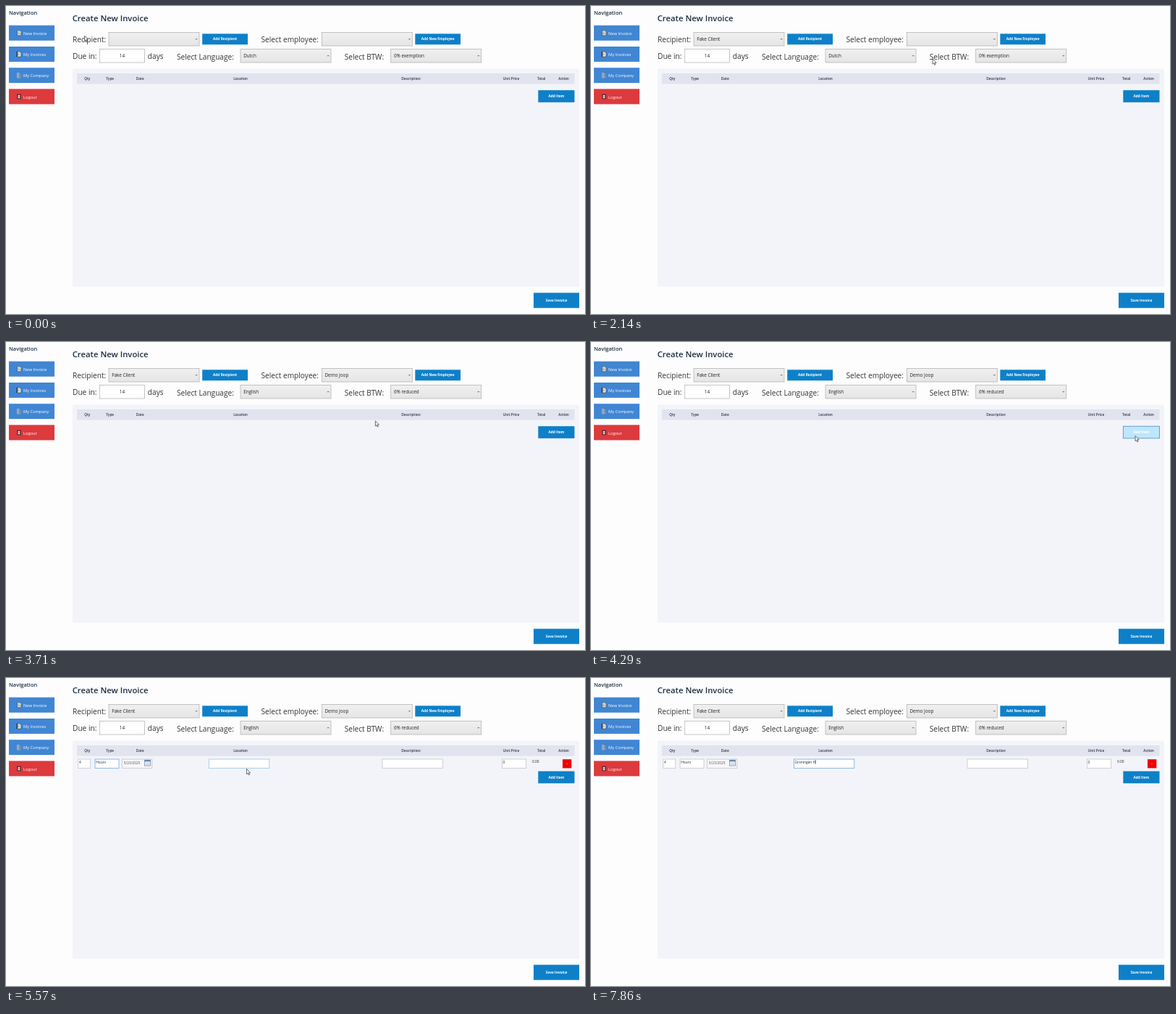
An HTML page that plays this animation: 800x425 px, repeating every 8000 ms.

```html
<!DOCTYPE html>
<html lang="en">
<head>
<meta charset="utf-8">
<title>Create New Invoice</title>
<style>
html, body { margin: 0; width: 100%; height: 100%; overflow: hidden; background: #fdfdfe; }
svg { display: block; width: 800px; height: 425px; }
text { font-family: "Open Sans", "Noto Sans", sans-serif; white-space: pre; }
</style>
</head>
<body>
<svg id="stage" viewBox="0 0 800 425"></svg>
<script>
const LOOP = 8000, STEPS = 56;
const BLUE = '#0e80c8', NAVY = '#1e2d44', FOCUS = '#569de5';
const CLIENT = 'Fake Client', WORKER = 'Demo Joop';

const rect = (x, y, w, h, fill, stroke, extra = '') =>
  `<rect x="${x}" y="${y}" width="${w}" height="${h}" fill="${fill}"` +
  (stroke ? ` stroke="${stroke}" stroke-width=".7"` : '') + ` ${extra}/>`;
const text = (x, y, s, size, fill = '#222', weight = 400, anchor = 'start') =>
  `<text x="${x}" y="${y}" font-size="${size}" fill="${fill}" font-weight="${weight}" text-anchor="${anchor}">${s}</text>`;
const path = (d, fill, extra = '') => `<path d="${d}" fill="${fill}" ${extra}/>`;

// Pointer tip by step, linear in between
const pointerKeys = [
  [0, 108.5, 41], [2, 125, 43], [6, 236, 51], [7, 215, 48], [9, 175, 61], [10, 172, 62],
  [13, 470, 46], [14, 473, 61], [15, 472, 73], [17, 560, 70], [18, 562, 95], [19, 470, 84],
  [20, 360, 69], [21, 360, 70], [23, 354, 95], [24, 354, 96], [29, 745, 128], [30, 752, 129.5],
  [31, 752, 129.5], [34, 113, 119], [36, 113, 119], [37, 140, 119], [38, 142, 119],
  [39, 332.5, 125.5], [40, 326, 121]
];
function pointerAt(k) {
  const i = pointerKeys.findIndex(p => p[0] >= k);
  if (i < 0) return null;
  if (i === 0) return pointerKeys[0].slice(1);
  const [k0, x0, y0] = pointerKeys[i - 1], [k1, x1, y1] = pointerKeys[i];
  const u = (k - k0) / (k1 - k0);
  return [x0 + (x1 - x0) * u, y0 + (y1 - y0) * u];
}
const over = (p, x, y, w, h) =>
  p && p[0] >= x && p[0] <= x + w && p[1] >= y && p[1] <= y + h + 2;

const combos = [
  { x: 142, y: 36.5, open: 7, set: 10, before: '', after: CLIENT, items: [CLIENT] },
  { x: 436.3, y: 36.5, open: 13, set: 15, delay: 1, before: '', after: WORKER, items: [WORKER] },
  { x: 324, y: 59.5, open: 21, set: 24, before: 'Dutch', after: 'English', items: ['Dutch', 'English'] },
  { x: 531.7, y: 59.5, open: 17, set: 19, before: '0% exemption', after: '6% reduced',
    items: ['0% exemption', '6% reduced', '21% standard'] }
];
const COMBO_W = 125, COMBO_H = 18.5, ITEM_H = 11;

function combo(c, k, p) {
  const isOpen = k >= c.open && k < c.set;
  const hot = isOpen || over(p, c.x, c.y, COMBO_W, COMBO_H);
  const ax = c.x + COMBO_W - 5.5, ay = c.y + 8.4;
  return rect(c.x, c.y, COMBO_W, COMBO_H, hot ? 'url(#hot)' : 'url(#idle)', hot ? '#7eb4ea' : '#acacac') +
    path(`M${ax} ${ay}h3.2l-1.6 1.9z`, hot ? '#222' : '#777') +
    text(c.x + 4.2, c.y + 11.5, k >= c.set + (c.delay || 0) ? c.after : c.before, 6.35);
}
function popup(c, k, p) {
  if (k < c.open || k >= c.set) return '';
  const top = c.y + COMBO_H + .5;
  return rect(c.x, top, COMBO_W, c.items.length * ITEM_H + 1, '#fff', '#888') +
    c.items.map((s, i) => {
      const y = top + .5 + i * ITEM_H;
      const hot = p && p[1] >= y && p[1] < y + ITEM_H;
      return (hot ? rect(c.x + .8, y, COMBO_W - 1.6, ITEM_H, '#d4e8f9', '#8dbfea') : '') +
        text(c.x + 4.2, y + 7.7, s, 6.35);
    }).join('');
}
function button(x, y, w, h, label, hot) {
  return rect(x, y, w, h, hot ? '#bee6fd' : BLUE, hot ? '#3c7fb1' : '') +
    text(x + w / 2, y + h / 2 + 1.7, label, 4.8, '#fff', 700, 'middle');
}

const docIcon = y =>
  path(`M15.5 ${y - 3.5}h3.5l1.8 1.8v5.2h-5.3z`, '#eef1f4', 'stroke="#26364a" stroke-width=".6"') +
  path(`M16.5 ${y - 1.5}h2M16.5 ${y}h2M16.5 ${y + 1.5}h2`, 'none', 'stroke="#39434e" stroke-width=".6"');
const icons = [
  y => docIcon(y) + path(`M18 ${y + 2}l3-3`, 'none', 'stroke="#d79a36" stroke-width="1"'),
  y => docIcon(y) + path(`M15.3 ${y - 3.5}v7`, 'none', 'stroke="#222" stroke-width="1.2"'),
  y => rect(15.2, y - 3.5, 3.2, 7, '#b9c1c8') + rect(18.4, y - 1.7, 2.5, 5.2, '#87939e') +
    path(`M16 ${y - 2}h1.5M16 ${y}h1.5M16 ${y + 2}h1.5M19 ${y}h1.3`, 'none', 'stroke="#34536d" stroke-width=".7"'),
  y => rect(15.5, y - 3.3, 5, 6.6, '#2b2022') + rect(16.6, y - 2.2, 2.7, 4.5, '#f4eeee') +
    path(`M18 ${y - .8}v1.6`, 'none', 'stroke="#b33" stroke-width="1"')
];
const nav = ['New Invoice', 'My Invoices', 'My Company', 'Logout'].map((s, i) => {
  const y = 26.7 + i * 29.25;
  return rect(4, y, 63, 21, i === 3 ? '#dc3a3d' : '#4186d3') +
    icons[i](y + 10.6) + text(24, y + 13.1, s, 5.75, '#fff');
}).join('');

const labels = [
  [92, 50, 'Recipient:'], [352.5, 50, 'Select employee:'], [92, 73, 'Due in:'],
  [195.8, 73, 'days'], [236, 73.5, 'Select Language:'], [467.7, 73.5, 'Select BTW:']
].map(([x, y, s]) => text(x, y, s, 10.15, '#333')).join('');

const headers = [
  [112.3, 'Qty'], [143.7, 'Type'], [185.3, 'Date'], [324, 'Location'], [559.5, 'Description'],
  [698, 'Unit Price'], [739.7, 'Total'], [770.6, 'Action']
].map(([x, s]) => text(x, 101.9, s, 4.75, '#2b3345', 600, 'middle')).join('');

const backdrop = `<defs>
  <linearGradient id="idle" x2="0" y2="1"><stop stop-color="#f0f0f0"/><stop offset="1" stop-color="#e5e5e5"/></linearGradient>
  <linearGradient id="hot" x2="0" y2="1"><stop stop-color="#ecf4fc"/><stop offset="1" stop-color="#dcecfc"/></linearGradient>
  </defs>` + rect(0, 0, 800, 425, '#fdfdfe') +
  text(4, 12, 'Navigation', 7.5, NAVY, 600) + nav +
  text(91.7, 20.8, 'Create New Invoice', 11.3, NAVY, 600) + labels +
  rect(129.3, 59.5, 62.2, 18.5, '#fff', '#abadb3') + text(160.4, 71, '14', 6.35, '#222', 400, 'middle') +
  button(271.2, 38.3, 62.8, 14.9, 'Add Recipient') + button(565.3, 38.3, 62.7, 14.9, 'Add New Employee') +
  rect(92, 86.5, 700, 301, '#f3f4f9', '', 'rx="2"') + rect(98, 93, 687.5, 14.6, '#e1e4ee') + headers +
  button(729, 395.7, 63, 21, 'Save Invoice');

// Location field: typed, then corrected
function locationText(k) {
  const tail = ['', ' ', ' H', ' Ho', ' Hof', ' Hofs', ' Ho', ' H'];
  return k < 48 ? 'Groningen'.slice(0, Math.max(0, k - 40)) + (k >= 47 ? 'ng' .slice(0, 0) + 'en'.slice(0, k >= 48 ? 2 : 0) : '')
    : 'Groningen' + tail[k - 48];
}
function field(x, w, value, mode) {
  const stroke = mode === 'focus' ? FOCUS : mode === 'hover' ? '#8abbe8' : '#b9bcc3';
  return rect(x, 112, w, 12.3, '#fff', stroke) + text(x + 1.3, 117.6, value, 4.8);
}
const calendar = rect(191.6, 113.2, 8, 7.8, '#fff', '#5e7792') + rect(191.6, 113.2, 8, 2.1, '#5c83b8') +
  path('M193 117h5.4M193 119.2h5.4', 'none', 'stroke="#7d8ba0" stroke-width="1" stroke-dasharray="1.2 .8"');

function row(k, p) {
  const qtyFocus = k >= 35 && k < 37, typeFocus = k >= 37 && k < 41;
  const type = 'Hours'.slice(0, k < 38 ? 0 : k < 39 ? 3 : 5);
  const locMode = k >= 41 ? 'focus' : over(p, 280.3, 112, 83.5, 12.3) ? 'hover' : '';
  return field(99.8, 17, k >= 36 ? '4' : '0', qtyFocus && 'focus') +
    field(123, 33, type, typeFocus && 'focus') +
    rect(160.3, 112, 41.5, 12.3, '#f7f7f9', '#b9bcc3') + text(162.7, 118.7, '5/23/2025', 4.85, '#555') + calendar +
    field(280.3, 83.5, '', locMode) +
    `<text id="typed" x="281.6" y="117.6" font-size="4.8" fill="#222">${locationText(k)}</text>` +
    field(520, 83.3, '') + field(685.3, 33.4, '0') + text(727, 117.3, '0.00', 4.8) +
    rect(769, 112.2, 12.3, 12.2, '#ee0000') + path('M774 118.3h2', 'none', 'stroke="#f79a9a" stroke-width=".7"');
}
const pointer = ([x, y]) =>
  `<g transform="translate(${x} ${y})">` +
  path('M0 0V7.2L1.7 5.7 2.8 8.3 4 7.8 2.9 5.3H5.1Z', '#fff', 'stroke="#222" stroke-width=".65"') + '</g>';

const stage = document.getElementById('stage');
function draw(k) {
  const p = pointerAt(k), hasRow = k >= 31;
  const addY = hasRow ? 128.6 : 116.2;
  stage.innerHTML = backdrop +
    combos.map(c => combo(c, k, p)).join('') +
    (hasRow ? row(k, p) : '') +
    button(735.3, addY, 50.2, 16.7, 'Add Item', over(p, 735.3, addY, 50.2, 14.7)) +
    combos.map(c => popup(c, k, p)).join('') +
    (p ? pointer(p) : '');
  if (k >= 41) {
    const x = 281.8 + document.getElementById('typed').getComputedTextLength();
    stage.insertAdjacentHTML('beforeend', path(`M${x} 112.9v5.8`, 'none', 'stroke="#222" stroke-width=".6"'));
  }
}

let shown = -1;
function tick() {
  const k = Math.floor(((performance.now() + 4) % LOOP) * STEPS / LOOP);
  if (k !== shown) draw(shown = k);
  requestAnimationFrame(tick);
}
tick();
document.fonts.ready.then(() => draw(shown));
</script>
</body>
</html>
```
